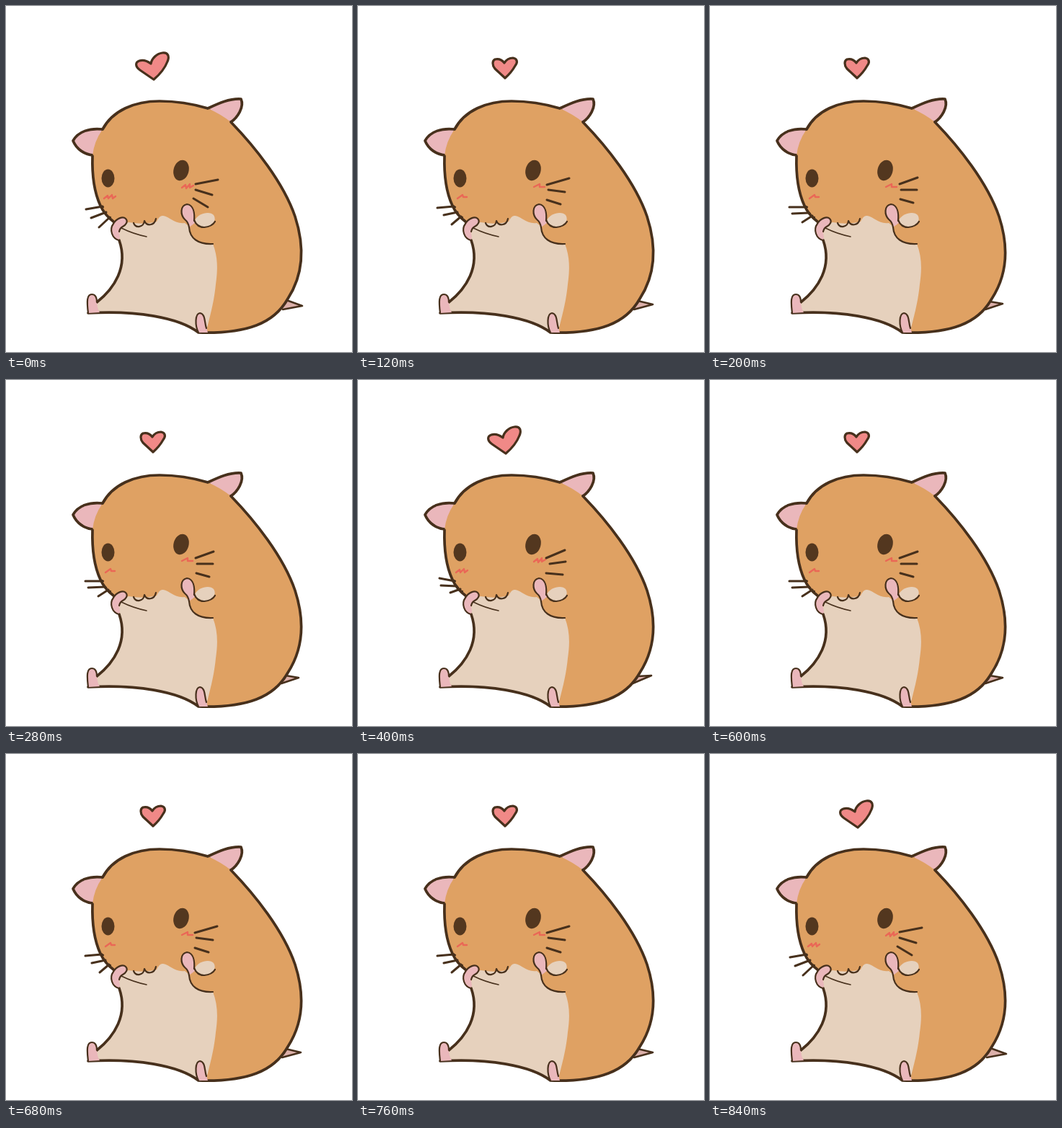
Animation of 480x480 px, one loop 920 ms. Source, as an HTML page:

```html
<!DOCTYPE html>
<html lang="en">
<head>
<meta charset="utf-8">
<title>Hamster</title>
<style>
  html, body { margin: 0; width: 100%; height: 100%; overflow: hidden; background: #fff; }
  svg { display: block; width: 100%; height: 100%; }
  .line { fill: none; stroke: #47301c; stroke-width: 3.7; stroke-linecap: round; stroke-linejoin: round; }
  .thin { stroke-width: 2.2; }
  .fur { fill: #dfa163; }
  .cream { fill: #e6d1bd; }
  .pink { fill: #eab7bb; }
  .eye { fill: #53371f; }
  #blush { fill: none; stroke: #ea6756; stroke-width: 2.4; stroke-linejoin: round; stroke-linecap: round; }
  #heart { fill: #f08987; stroke-width: 3.2; }
  #tail { fill: #dcb0aa; stroke-width: 2.6; }
  #whiskers { stroke-width: 3; }
</style>
</head>
<body>
<svg viewBox="0 0 480 480">
  <path id="tail" class="line"/>

  <!-- ears -->
  <path class="line pink" d="M134 171C116 169 100 174 93 187C98 199 109 206 121 207L140 200Z"/>
  <path class="line pink" d="M280 142C295 135 310 128 326 129C331 140 321 155 312 161L296 165Z"/>

  <!-- body -->
  <path class="fur" d="M134 171C148 145 178 132 213 132C237 132 260 136 280 142Q298 150 312 161
    C345 195 385 245 401 292C414 332 413 372 391 406C372 440 335 455 267 453
    C240 432 180 422 114 426L126 411C150 392 170 362 157 325L148 300
    C125 276 119 244 120 208Q122 188 134 171Z"/>
  <path class="cream" d="M158 325C154 316 160 303 170 300Q192 304 209 299Q213 290 218 291
    C227 292 234 303 248 301L254 306C255 321 266 331 287 330C294 348 294 366 291 386
    C288 416 282 432 278 452L267 453C240 432 180 422 116 426L126 411C150 392 170 362 158 325Z"/>
  <path class="cream" d="M262 297C267 287 283 284 288 290C293 298 286 305 276 307C267 306 262 303 262 297Z"/>

  <path class="line" d="M134 171C148 145 178 132 213 132C237 132 260 136 280 142"/>
  <path class="line" d="M312 161C345 195 385 245 401 292C414 332 413 372 391 406C372 440 335 455 267 453
    C240 432 180 422 114 426"/>
  <path class="line" d="M126 411C150 392 170 362 157 325"/>
  <path class="line" d="M120 208C119 240 124 262 131 277Q137 290 149 299"/>

  <!-- feet -->
  <path class="pink" d="M114 426C112 410 112 400 119 400Q127 400 126 411Q127 421 130 425Z"/>
  <path class="line thin" d="M114 426C112 410 112 400 119 400Q126 400 126 411"/>
  <path class="pink" d="M267 453C262 443 262 427 269 426C278 427 277 442 280 453Z"/>
  <path class="line thin" d="M267 453C262 443 262 427 269 426C277 427 275 439 278 447"/>

  <!-- paws -->
  <path class="pink" d="M157 325C147 323 143 310 149 302C153 295 162 291 166 295C170 299 166 304 162 306C157 308 156 313 158 320Z"/>
  <path class="line thin" d="M157 325C147 323 143 310 149 302C153 295 162 291 166 295C170 299 166 304 162 306Q158 308 157 313"/>
  <path class="line" style="stroke-width:1.5" d="M160 308Q176 316 195 320"/>
  <path class="pink" d="M262 301C262 289 260 276 251 275C241 277 242 290 248 296Q253 300 254 307Z"/>
  <path class="line thin" d="M261 298C262 287 260 276 251 275C241 277 242 290 248 296Q253 300 254 307C255 322 266 331 287 330"/>
  <path class="line thin" d="M261 297Q265 307 275 307Q286 306 290 299"/>

  <!-- face -->
  <ellipse class="eye" cx="141.5" cy="239" rx="9" ry="12.5"/>
  <ellipse class="eye" cx="243" cy="228" rx="10.5" ry="14.5" transform="rotate(15 243 228)"/>
  <path class="line thin" d="M177 301C180 309 191 307 192 298C195 306 206 305 208 295"/>
  <path class="line thin" d="M131 277l4 2M136 286l3 2M141 292l4 1"/>

  <path id="blush"/>
  <path id="whiskers" class="line"/>
  <path id="heart" class="line"/>
</svg>
<script>
const LOOP = 920;

// heart and blush share two drawings
const pulses = {
  big: {
    heart: 'M205 102L186 89C179 84 179 78 185 76C191 74 197 77 201 80C202 73 209 66 217 65C225 64 227 70 224 77Q219 90 205 102Z',
    blush: 'M136 267L141 263L142 267L147 262L148 267L152 264M244 252L249 248L250 253L255 247L255 252L260 249'
  },
  small: {
    heart: 'M204 100L190 87C186 82 186 76 190 74C195 73 200 75 203 79C206 74 210 72 215 72C221 73 222 78 218 83Q213 92 204 100Z',
    blush: 'M138 267L145 262L146 265L151 265M244 251L252 247L252 251L259 251'
  }
};

// whiskers from the lowest to the highest position
const poses = [
  { pulse: 'big', tail: 'M389 408L411 416L384 421',
    whiskers: 'M263 247L294 241M263 255L286 262M260 267L280 279M111 282L134 278M118 294L139 286M129 307L143 294' },
  { pulse: 'small', tail: 'M388 409L409 414L383 421',
    whiskers: 'M262 248L293 239M264 255L287 258M262 269L281 275M110 280L133 278M119 290L138 286M130 303L143 292' },
  { pulse: 'small', tail: 'M388 410L406 413L382 421',
    whiskers: 'M263 247L288 238M265 255L287 255M264 268L282 273M110 279L134 279M114 288L137 287M128 300L142 291' },
  { pulse: 'big', tail: 'M388 411L407 410L381 421',
    whiskers: 'M261 247L287 236M266 255L288 252M261 268L284 270M113 275L134 279M115 285L137 286M128 295L142 290' }
];

// [start in ms, pose]
const steps = [[0, 0], [80, 1], [200, 2], [400, 3], [520, 2], [680, 1], [800, 0]];

const setPath = (id, d) => document.getElementById(id).setAttribute('d', d);
let shown = -1;

function draw(now) {
  const t = now % LOOP;
  const index = steps.filter(([start]) => start <= t).pop()[1];
  if (index !== shown) {
    const { pulse, tail, whiskers } = poses[index];
    setPath('tail', tail);
    setPath('whiskers', whiskers);
    setPath('heart', pulses[pulse].heart);
    setPath('blush', pulses[pulse].blush);
    shown = index;
  }
}

const begin = performance.now();
function tick() {
  draw(performance.now() - begin);
  requestAnimationFrame(tick);
}
tick();
</script>
</body>
</html>
```
